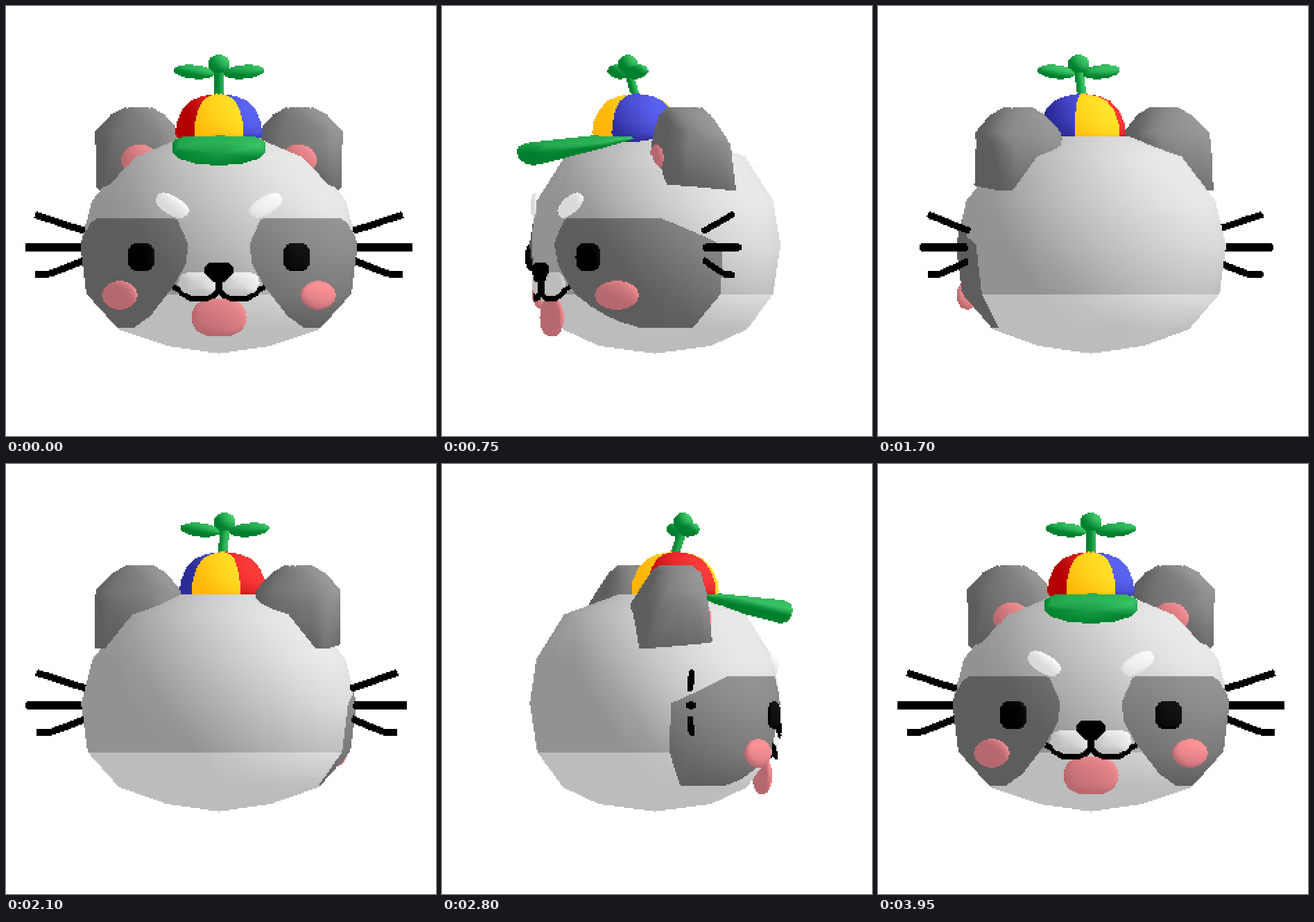
An HTML page with a canvas for the animation above (4 s loop, 620 px wide and 620 px high).

```html
<!DOCTYPE html>
<html lang="en">
<head>
<meta charset="utf-8">
<title>Spinning raccoon</title>
<style>
  html, body { margin: 0; width: 100%; height: 100%; overflow: hidden; background: #fff; }
  canvas { display: block; width: 620px; height: 620px; image-rendering: pixelated; }
</style>
</head>
<body>
<canvas id="stage" width="310" height="310"></canvas>
<script>
const SIZE = 310, AXIS = 307, STEP = 50, STEPS = 80, TAU = Math.PI * 2;
const LIGHT = [0.7, -0.6, 0.38];

// Each material runs from its shaded to its lit colour.
const rgb = hex => [hex >> 16, hex >> 8 & 255, hex & 255];
const tone = (dark, lit) => ({ dark: rgb(dark), lit: rgb(lit) });
const GREY = tone(0x929292, 0xececec);
const WHITE = tone(0xbcbcbc, 0xffffff);
const BROW = tone(0xdadada, 0xffffff);
const FUR = tone(0x5d5d5d, 0x9a9a9a);
const PINK = tone(0xb5686e, 0xff9498);
const BLACK = tone(0x000000, 0x000000);
const EYE = tone(0x000000, 0x161616);
const RED = tone(0xb20000, 0xff3c3c);
const BLUE = tone(0x2c2c98, 0x5c64f4);
const YELLOW = tone(0xffb608, 0xffe62c);
const GREEN = tone(0x00802e, 0x42cc6c);

const meshes = [];
const sub = (a, b) => [a[0] - b[0], a[1] - b[1], a[2] - b[2]];
const dot = (a, b) => a[0] * b[0] + a[1] * b[1] + a[2] * b[2];
const cross = (a, b) => [
  a[1] * b[2] - a[2] * b[1],
  a[2] * b[0] - a[0] * b[2],
  a[0] * b[1] - a[1] * b[0]
];
const power = (v, e) => Math.sign(v) * Math.abs(v) ** e;
const around = (n, fn) => Array.from({ length: n }, (_, i) => fn(i / n * TAU));

// Joins rings of points into a closed skin with smooth normals.
function loft(paint, rings) {
  const m = rings[0].length;
  const cap = ring => {
    const mid = [0, 1, 2].map(k => ring.reduce((s, p) => s + p[k], 0) / m);
    return ring.map(() => mid);
  };
  const all = [cap(rings[0]), ...rings, cap(rings[rings.length - 1])];
  const verts = all.flat();
  const normals = verts.map(() => [0, 0, 0]);
  const faces = [];
  let volume = 0;
  for (let i = 0; i < all.length - 1; i++) {
    for (let j = 0; j < m; j++) {
      const a = i * m + j, b = i * m + (j + 1) % m;
      faces.push([a, b, a + m], [b, b + m, a + m]);
    }
  }
  for (const face of faces) {
    const [a, b, c] = face.map(i => verts[i]);
    const n = cross(sub(b, a), sub(c, a));
    volume += dot(a, n);
    for (const i of face) for (let k = 0; k < 3; k++) normals[i][k] += n[k];
  }
  const sign = Math.sign(volume);
  for (const n of normals) {
    const len = sign * (Math.hypot(...n) || 1);
    for (let k = 0; k < 3; k++) n[k] /= len;
  }
  meshes.push({ paint, verts, normals, faces });
}

// Ellipsoid whose flat side faces along yaw; tilt turns it within its plane.
function blob(paint, center, radii, yaw = 0, tilt = 0, square = 1) {
  const cy = Math.cos(yaw), sy = Math.sin(yaw), ct = Math.cos(tilt), st = Math.sin(tilt);
  const rings = [];
  for (let i = 1; i < 10; i++) {
    const lat = i / 10 * Math.PI;
    rings.push(around(16, b => {
      const u = radii[0] * Math.sin(lat) * power(Math.cos(b), square);
      const v = radii[1] * Math.sin(lat) * power(Math.sin(b), square);
      const w = radii[2] * Math.cos(lat);
      const x = u * ct - v * st;
      return [center[0] + x * cy + w * sy, center[1] + u * st + v * ct, center[2] - x * sy + w * cy];
    }));
  }
  loft(paint, rings);
}

function tube(paint, path, r) {
  loft(paint, path.map((p, i) => {
    const d = sub(path[Math.min(i + 1, path.length - 1)], path[Math.max(i - 1, 0)]);
    const len = Math.hypot(d[0], d[1]);
    return around(6, b => [
      p[0] - d[1] / len * r * Math.cos(b),
      p[1] + d[0] / len * r * Math.cos(b),
      p[2] + r * Math.sin(b)
    ]);
  }));
}

function lookup(points, at) {
  let i = 1;
  while (i < points.length - 1 && points[i][0] < at) i++;
  const [a, b] = [points[i - 1], points[i]];
  return a[1] + (b[1] - a[1]) * (at - a[0]) / (b[0] - a[0]);
}

// Inner border of the eye patch: height to distance from the middle.
const PATCH_EDGE = [[294, 102], [308, 60], [344, 44], [372, 48], [402, 64], [447, 99], [465, 124]];

function headPaint(x, y, z) {
  const u = Math.abs(x);
  const patch = y > 294 && y < 465 &&
    u > lookup(PATCH_EDGE, y) &&
    y > 294 + 0.0022 * Math.max(0, u - 102) ** 2 &&
    y > 306 + (61 - z) * 0.44 * (z < 61) &&
    z > -28 + Math.max(0, y - 415) * 0.56;
  return patch ? FUR : y > 415 ? WHITE : GREY;
}

function capPaint(x, y, z) {
  if (Math.abs(x) < Math.abs(z - 30) * 0.7) return YELLOW;
  return x < 0 ? RED : BLUE;
}

function buildHead() {
  const rings = [
    [188, 55, 52], [217, 131, 131], [281, 183, 170], [345, 200, 179], [415, 191, 168],
    [466, 145, 132], [490, 75, 82], [501, 1, 1]
  ];
  loft(headPaint, rings.map(([y, rx, rz]) =>
    around(24, b => [rx * Math.cos(b), y, rz * Math.sin(b)])));
}

function buildSide(s) {
  // Ear: height, middle x and z, half widths, squareness.
  const ear = [
    [147, 116, 0, 21, 26, 1], [157, 117, 0, 39, 36, 0.9], [182, 118, -5, 62, 45, 0.8],
    [200, 118, -9, 60, 52, 0.7], [262, 118, -10, 58, 57, 0.5]
  ];
  loft(FUR, ear.map(([y, x, z, hx, hz, e], i) => around(16, b => {
    const v = power(Math.sin(b), e);
    return [s * (x + hx * power(Math.cos(b), e)), y - (i === 4 ? 5 * v : 0), z + hz * v];
  })));
  blob(PINK, [s * 115, 223, 41], [27, 24, 11]);

  blob(EYE, [s * 112, 362, 148], [22, 20, 7], s * 0.54, 0, 0.6);
  blob(PINK, [s * 143, 417, 116], [35, 21, 10], s * 0.785);
  blob(BROW, [s * 67, 288, 157], [28, 14, 9], s * 0.38, -s * 0.5, 0.85);
  blob(WHITE, [s * 29, 400, 162], [30, 20, 14], s * 0.1, 0, 0.6);

  const mouth = [[2, 411], [8, 418], [18, 422], [40, 422], [54, 414], [57, 409], [66, 405]];
  tube(BLACK, mouth.map(([x, y]) => [s * x, y, 177 - x * x * 0.0045]), 4);

  const whiskers = [
    [[190, 325], [220, 316], [240, 309], [265, 301]],
    [[190, 348], [279, 348]],
    [[190, 365], [222, 378], [244, 386], [265, 388]]
  ];
  whiskers.forEach((w, i) =>
    tube(BLACK, w.map(([x, y]) => [s * x, y, (198 - x) * 0.22]), i === 1 ? 6 : 5));

  blob(GREEN, [s * 36, 95, 42], [30, 10, 13], 0, -s * 0.1);
}

function buildMiddle() {
  blob(BLACK, [0, 381, 177], [21, 12, 12], 0, 0, 0.7);
  blob(BLACK, [0, 391, 177], [13, 9, 11]);
  tube(BLACK, [[0, 390, 177], [0, 416, 177]], 5);
  blob(PINK, [0, 449, 160], [40, 28, 10], 0, 0, 0.85);

  const dome = [[126, 2], [130, 25], [137, 41], [150, 53], [168, 61], [183, 63], [195, 58]];
  loft(capPaint, dome.map(([y, r]) =>
    around(24, b => [r * Math.cos(b), y, 30 + r * Math.sin(b)])));

  // Visor: depth, half width, middle height, rise, drop.
  const visor = [[55, 58, 190, 4, 6], [100, 66, 196, 9, 12], [188, 67, 210, 14, 20]];
  loft(GREEN, visor.map(([z, w, y, up, down]) => around(12, b => {
    const v = Math.sin(b);
    return [w * Math.cos(b), y + v * (v < 0 ? up : down), z];
  })));

  loft(GREEN, [[130, 30], [92, 42]].map(([y, z]) =>
    around(8, b => [7 * Math.cos(b), y, z + 7 * Math.sin(b)])));
  blob(GREEN, [0, 84, 42], [16, 14, 14]);
}

buildHead();
buildSide(-1);
buildSide(1);
buildMiddle();

const ctx = document.getElementById("stage").getContext("2d");
const image = ctx.createImageData(SIZE, SIZE);
const depth = new Float32Array(SIZE * SIZE);

function fillTriangle(p, q, r, paint) {
  const area = (q.X - p.X) * (r.Y - p.Y) - (r.X - p.X) * (q.Y - p.Y);
  if (Math.abs(area) < 1e-6) return;
  const left = Math.max(0, Math.ceil(Math.min(p.X, q.X, r.X) - 0.5));
  const right = Math.min(SIZE - 1, Math.floor(Math.max(p.X, q.X, r.X) - 0.5));
  const top = Math.max(0, Math.ceil(Math.min(p.Y, q.Y, r.Y) - 0.5));
  const bottom = Math.min(SIZE - 1, Math.floor(Math.max(p.Y, q.Y, r.Y) - 0.5));
  for (let j = top; j <= bottom; j++) {
    for (let i = left; i <= right; i++) {
      const x = i + 0.5, y = j + 0.5;
      const a = ((q.X - x) * (r.Y - y) - (r.X - x) * (q.Y - y)) / area;
      const b = ((r.X - x) * (p.Y - y) - (p.X - x) * (r.Y - y)) / area;
      const c = 1 - a - b;
      if (a < 0 || b < 0 || c < 0) continue;
      const d = a * p.D + b * q.D + c * r.D, at = j * SIZE + i;
      if (d <= depth[at]) continue;
      depth[at] = d;
      const mat = typeof paint !== "function" ? paint : paint(
        a * p.v[0] + b * q.v[0] + c * r.v[0],
        y * 2,
        a * p.v[2] + b * q.v[2] + c * r.v[2]);
      const lit = a * p.lit + b * q.lit + c * r.lit;
      for (let k = 0; k < 3; k++) {
        image.data[at * 4 + k] = mat.dark[k] + (mat.lit[k] - mat.dark[k]) * lit;
      }
    }
  }
}

function draw(angle) {
  const c = Math.cos(angle), s = Math.sin(angle);
  image.data.fill(255);
  depth.fill(-1e9);
  for (const { paint, verts, normals, faces } of meshes) {
    const points = verts.map((v, i) => {
      const n = normals[i];
      const facing = [n[0] * c - n[2] * s, n[1], n[0] * s + n[2] * c];
      return {
        v,
        X: (AXIS + v[0] * c - v[2] * s) / 2,
        Y: v[1] / 2,
        D: v[0] * s + v[2] * c,
        lit: Math.max(0, dot(facing, LIGHT))
      };
    });
    for (const [i, j, k] of faces) fillTriangle(points[i], points[j], points[k], paint);
  }
  ctx.putImageData(image, 0, 0);
}

let shown = -1;
function tick() {
  const step = Math.floor(performance.now() / STEP) % STEPS;
  if (step !== shown) {
    shown = step;
    draw(step / (STEPS - 1) * TAU);
  }
  requestAnimationFrame(tick);
}
tick();
</script>
</body>
</html>
```
